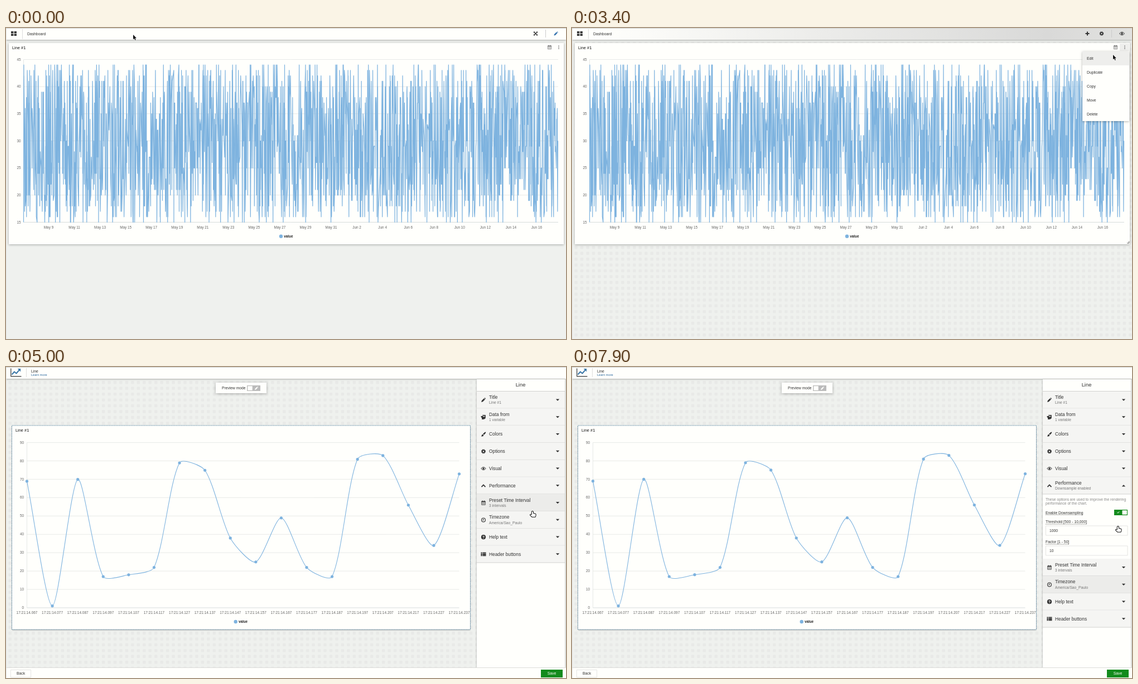
Animation, 1004 px wide and 558 px high, one loop 8000 ms. Source, as an HTML page with a canvas:

```html
<!DOCTYPE html>
<html lang="en">
<head>
<meta charset="utf-8">
<title>Dashboard</title>
<style>
html, body { margin: 0; width: 1004px; height: 558px; overflow: hidden; background: #eff1ee; }
canvas { display: block; }
</style>
</head>
<body>
<canvas id="stage" width="1004" height="558"></canvas>
<script>
const c = document.getElementById('stage').getContext('2d');
const PAPER = '#fffffc', BACK = '#eff1ee', BLUE = '#7eb3df', INK = '#333', GREEN = '#138b1d';
const SMALL = 6.8;

// ---- helpers ----
function box(x, y, w, h, fill, stroke) {
  if (fill) { c.fillStyle = fill; c.fillRect(x, y, w, h); }
  if (stroke) { c.strokeStyle = stroke; c.lineWidth = 0.8; c.strokeRect(x, y, w, h); }
}
function card(x, y, w, h, blur = 4) {
  c.save();
  c.shadowColor = 'rgba(0,0,0,.3)';
  c.shadowBlur = blur;
  c.shadowOffsetY = 1;
  box(x, y, w, h, PAPER);
  c.restore();
}
function text(s, x, y, size = SMALL, color = INK, align = 'left', weight = '') {
  c.font = `${weight} ${size}px "Liberation Sans", Arial, sans-serif`;
  c.textAlign = align;
  c.fillStyle = color;
  c.fillText(s, x, y);
}
function line(x1, y1, x2, y2, color, width = 1, dash = []) {
  c.strokeStyle = color;
  c.lineWidth = width;
  c.setLineDash(dash);
  c.beginPath();
  c.moveTo(x1, y1);
  c.lineTo(x2, y2);
  c.stroke();
  c.setLineDash([]);
}
function dot(x, y, r, color) {
  c.fillStyle = color;
  c.beginPath();
  c.arc(x, y, r, 0, 7);
  c.fill();
}
function ring(x, y, r, color, width, dash = []) {
  c.strokeStyle = color;
  c.lineWidth = width;
  c.setLineDash(dash);
  c.beginPath();
  c.arc(x, y, r, 0, 2 * Math.PI);
  c.stroke();
  c.setLineDash([]);
}

// ---- icons, centred on the given point ----
const shapes = {
  plus: 'M-3.5-1H-1V-3.5H1V-1H3.5V1H1V3.5H-1V1H-3.5Z',
  pencil: 'M-4 4L-3.3 1.2L1-3L3-1L-1.2 3.3ZM1.6-3.6L2.5-4.3L4.3-2.5L3.6-1.6Z',
  expand: 'M-4-4H-1L-2-3L0-1L2-3L1-4H4V-1L3-2L1 0L3 2L4 1V4H1L2 3L0 1L-2 3L-1 4H-4V1L-3 2L-1 0L-3-2L-4-1Z',
  blocks: 'M-5-4H-.6V-.5H-5ZM.6-4H5V-.5H.6ZM-5 .6H-.6V4H-5ZM.6 .6H5V4H.6Z',
  chevron: 'M-4.3 1.6L0-2.8L4.3 1.6L3 2.9L0-.1L-3 2.9Z',
  brush: 'M4.5-4.5L4-2L1 1.2L-1-.6L2.5-4ZM-1.5 0L.4 1.8Q0 4-2 4H-4.5Q-3.3 3.2-3.2 1.6Q-2.8 .1-1.5 0Z',
  list: 'M-4.8-3.6H-2.4V-1.5H-4.8ZM-1.6-3.6H4.8V-1.5H-1.6ZM-4.8-1H-2.4V1H-4.8ZM-1.6-1H4.8V1H-1.6ZM-4.8 1.5H-2.4V3.6H-4.8ZM-1.6 1.5H4.8V3.6H-1.6Z',
  data: 'M-2-4.2H4V2Q3 4.2-.5 4.2H-3V1.5L-4.6 0V-2H-1L1 0L3-2.6Q0-1.8-2-3Z',
  check: 'M-3 0L-2.2-.8L-.9 .5L2-2.4L2.8-1.6L-.9 2.1Z',
  up: 'M-3.2 1.6L0-1.6L3.2 1.6Z',
  down: 'M-3.2-1.6L0 1.6L3.2-1.6Z'
};
const drawn = {
  gear(color) {
    ring(0, 0, 2.3, color, 2);
    ring(0, 0, 3.6, color, 1.2, [1.6, 1.227]);
  },
  eye(color) {
    c.strokeStyle = color;
    c.lineWidth = 1;
    c.stroke(new Path2D('M-4.5 0Q0-5.4 4.5 0Q0 5.4-4.5 0Z'));
    dot(0, 0, 1.7, color);
  },
  calendar(color) {
    box(-3.5, -2.8, 7, 6.6, null, color);
    box(-3.5, -3, 7, 1.8, color);
    box(-2.4, -4.4, 1, 2, color);
    box(1.4, -4.4, 1, 2, color);
    for (const v of [-1.2, 1.2]) line(v, -1, v, 3.8, color, 0.5);
    line(-3.5, 1.2, 3.5, 1.2, color, 0.5);
  },
  clock(color) {
    ring(0, 0, 3.6, color, 1.2);
    line(0, -2.4, 0, 0.5, color);
    line(0.4, 0.3, -1.7, 0.3, color);
  },
  help(color) {
    dot(0, 0, 4.3, color);
    text('?', 0, 2.5, 7, PAPER, 'center', 'bold');
  }
};
function icon(name, x, y, color = INK, scale = 1) {
  c.save();
  c.translate(x, y);
  c.scale(scale, scale);
  if (drawn[name]) drawn[name](color);
  else { c.fillStyle = color; c.fill(new Path2D(shapes[name])); }
  c.restore();
}

// ---- shared pieces ----
function backdrop(dots, right = 1004) {
  box(0, 0, 1004, 558, BACK);
  if (!dots) return;
  c.fillStyle = '#e8e9e7';
  for (let y = 25; y < 558; y += 10.46)
    for (let x = 4.5; x < right; x += 10.46) {
      c.beginPath();
      c.roundRect(x, y, 5.4, 5.4, 1.2);
      c.fill();
    }
}
function header(fill) {
  card(0, 0, 1004, 21, 3);
  box(0, 0, 1004, 21, fill);
}
function legend(x, y) {
  dot(x, y, 3.2, BLUE);
  text('value', x + 5.3, y + 2.1, 6.3, '#222', 'left', 'bold');
}
function axisY(min, max, step, left, right, yOf, labelX) {
  for (let v = min; v <= max; v += step) {
    line(left, yOf(v), right, yOf(v), v === min ? '#d3d8d8' : '#e6e8e6', 0.9);
    text(v, labelX, yOf(v) + 2.1, 6.4, '#666', 'right');
  }
  line(left, yOf(min), left, yOf(max), '#e0e3e1', 0.8);
}

// ---- dashboard ----
let seed = 41;
const random = () => (seed = (seed * 16807) % 2147483647) / 2147483647;
const COUNT = 2000;
const noise = [];
for (let i = 0, x = 0; i < COUNT; i++) {
  noise.push([x, 15 + Math.floor(random() * 30)]);
  x += 0.15 - Math.log(random() + 0.001) * 0.85;
}
const span = noise[COUNT - 1][0];

function dashboard(t) {
  const edit = t >= 1800;
  backdrop(edit);
  let fill = PAPER;
  if (edit) {
    fill = c.createLinearGradient(0, 0, 1004, 0);
    fill.addColorStop(0.05, PAPER);
    fill.addColorStop(0.85, '#d9d9d8');
    fill.addColorStop(1, '#e2e2e0');
  }
  header(fill);
  icon('blocks', 14, 10);
  line(29.5, 2, 29.5, 20, '#ddd');
  text('Dashboard', 38, 12.8);
  line(967.5, 3, 967.5, 17, '#ccc');
  if (edit) {
    icon('plus', 924, 10);
    icon('gear', 949.5, 10, INK, 0.9);
    icon('eye', 986, 10);
  } else {
    if (t >= 1200) box(977, 4, 19, 13, '#ececea');
    icon('expand', 949.5, 10, INK, 0.9);
    icon('pencil', 986, 10, '#3a76b0', 0.9);
  }

  card(5, 27, 995, 361);
  text('Line #1', 11, 37.5, 7.4, '#111');
  if (t >= 2100) box(982, 28, 17, 13, '#eeeeec');
  icon('calendar', 974.5, 34.5, '#777', 0.9);
  for (let i = -1; i < 2; i++) dot(991, 34.5 + i * 2.4, 0.85, '#777');

  const yOf = v => 348.5 - (v - 15) * 9.733;
  axisY(15, 45, 5, 31.5, 990, yOf, 26.5);
  for (let i = 0; i < 20; i++) {
    const day = 9 + 2 * i;
    text(day > 31 ? `Jun ${day - 31}` : `May ${day}`, 76.5 + i * 46.05, 360, 6.4, '#666', 'center');
  }
  c.strokeStyle = BLUE;
  c.lineWidth = 1.25;
  c.lineJoin = 'round';
  c.beginPath();
  for (const [x, v] of noise) c.lineTo(31.5 + x / span * 958, yOf(v));
  c.stroke();
  legend(493, 373.8);
  if (edit) {
    line(995, 386, 999, 386, '#555', 0.9);
    line(998.6, 382.5, 998.6, 386, '#555', 0.9);
  }

  if (t >= 3000) {
    c.globalAlpha = Math.min(1, (t - 2900) / 300);
    card(915, 42, 84, 125);
    box(915, 42, 84, 25, '#eeeeec');
    ['Edit', 'Duplicate', 'Copy', 'Move', 'Delete'].forEach((s, i) => text(s, 923, 57 + i * 25));
    c.globalAlpha = 1;
  }
}

// ---- editor ----
const values = [69, 1, 70, 17, 18, 22, 79, 75, 38, 25, 49, 22, 17, 81, 83, 56, 34, 73];
const rows = [
  ['pencil', 'Title', 'Line #1'], ['data', 'Data from', '1 variable'], ['brush', 'Colors'],
  ['gear', 'Options'], ['eye', 'Visual'], ['chevron', 'Performance'],
  ['calendar', 'Preset Time Interval', '3 intervals'], ['clock', 'Timezone', 'America/Sao_Paulo'],
  ['help', 'Help text'], ['list', 'Header buttons']
];
const ROW = 30.75;

function chart(t) {
  const p = Math.max(0, Math.min(1, (t - 4184) / 1000));
  const grow = 1 - (1 - p) ** 4;
  const yOf = v => 432 - v * 3.294;
  card(11, 105, 821, 366, 2);
  c.setLineDash([2, 1]);
  box(10.5, 105, 822, 366, null, '#4d7f9d');
  c.setLineDash([]);
  text('Line #1', 17, 116, 7.4, '#111');
  axisY(0, 90, 10, 37.5, 812.5, yOf, 32);

  const pts = values.map((v, i) => [37.5 + i * 45.59, yOf(v * grow)]);
  // smooth curve: handles follow the neighbours, shared by distance
  const handles = pts.map((q, i) => {
    const a = pts[i - 1] || q, b = pts[i + 1] || q;
    const da = Math.hypot(q[0] - a[0], q[1] - a[1]), db = Math.hypot(b[0] - q[0], b[1] - q[1]);
    const k = 0.25 / (da + db);
    const move = d => [q[0] + d * k * (b[0] - a[0]), q[1] + d * k * (b[1] - a[1])];
    return { before: move(-da), after: move(db) };
  });
  c.strokeStyle = BLUE;
  c.lineWidth = 1.1;
  c.beginPath();
  c.moveTo(...pts[0]);
  for (let i = 1; i < pts.length; i++)
    c.bezierCurveTo(...handles[i - 1].after, ...handles[i].before, ...pts[i]);
  c.stroke();
  pts.forEach(([x, y], i) => {
    dot(x, y, 2.6, BLUE);
    text('17:21:14.' + String(67 + i * 10).padStart(3, '0'), x, 443.3, 6.5, '#666', 'center');
  });
  legend(411.7, 457);
}

function toggle(x, y, on, mark) {
  box(x, y, 24, 10, on ? GREEN : '#bbb');
  box(on ? x + 14.5 : x + 1.3, y + 1.2, 8.4, 7.6, PAPER);
  if (mark) icon(mark, x + (on ? 7.5 : 17), y + 5, PAPER, 0.75);
}

function settings(y, on) {
  const ink = on ? INK : '#999';
  const label = (s, ly, width, color) => {
    text(s, 849, ly, SMALL, color);
    line(849, ly + 1.7, 849 + width, ly + 1.7, color, 0.6, [1, 0.6]);
  };
  const field = (s, fy) => {
    box(849.4, fy, 146.6, 17, PAPER, '#dededc');
    text(s, 856, fy + 11, SMALL, on ? INK : '#777');
  };
  text('These options are used to improve the rendering', 849, y + 11.5, 6.7, '#888');
  text('performance of the chart.', 849, y + 18.5, 6.7, '#888');
  label('Enable Downsampling', y + 35.5, 67, INK);
  toggle(972, y + 28, on, on && 'check');
  label('Threshold [500 - 10,000]', y + 52.3, 73, ink);
  field('1000', y + 57);
  label('Factor [1 - 50]', y + 88.3, 42, ink);
  field('10', y + 93);
}

function panel(t) {
  const on = t >= 7100;
  const hover = latest(hovers, t)[1];
  const gap = 116 * Math.max(0, Math.min(1, (t - 5400) / 300));
  card(844, 22, 158, 517, 3);
  text('Line', 922.5, 35.3, 9.4, INK, 'center');
  rows.forEach(([name, label, sub], i) => {
    const y = 43.5 + i * ROW + (i > 5 ? gap : 0), mid = y + ROW / 2;
    if (i === 5 && on) sub = 'Downsample enabled';
    box(844, y, 158, ROW, i === hover ? '#ececea' : '#f5f5f3');
    line(844, y + ROW, 1002, y + ROW, '#d2d2d0');
    if (!i) line(844, y, 1002, y, '#d2d2d0');
    icon(name, 856, mid + 0.3, INK, 0.95);
    text(label, 866, sub ? mid - 1.7 : mid + 3, 8.35);
    if (sub) text(sub, 866, mid + 7.6, 6.7, '#777');
    icon(i === 5 && gap ? 'up' : 'down', 989, mid + 0.3);
  });
  if (gap) {
    c.save();
    c.beginPath();
    c.rect(844, 228.5, 158, gap - 1);
    c.clip();
    settings(228, on);
    c.restore();
  }
}

function editor(t) {
  backdrop(true, 843);
  header(PAPER);
  c.strokeStyle = INK;
  c.lineWidth = 1.2;
  c.stroke(new Path2D('M8.8 2.5V16.8H27.5'));
  c.strokeStyle = '#3a77a8';
  c.lineWidth = 2;
  c.stroke(new Path2D('M10.5 13.5L15 8.5L18.5 11.5L24 5.2'));
  c.fillStyle = '#3a77a8';
  c.fill(new Path2D('M20.8 3H26.2V8.4Z'));
  line(36.5, 2, 36.5, 18, '#ddd');
  text('Line', 45, 9.8);
  text('Learn more', 45, 16, 5.6, '#2d6a9f');

  card(376, 28, 91, 19, 5);
  text('Preview mode', 387, 40.3, 6.7);
  toggle(432, 33, false, 'pencil');
  chart(t);
  panel(t);

  box(0, 540, 1004, 18, PAPER);
  line(0, 539.5, 1004, 539.5, '#dcdcda');
  box(8.4, 543.4, 36.2, 13.4, PAPER, '#ddd');
  text('Back', 26.5, 552.4, SMALL, INK, 'center');
  box(959, 543, 39, 14, GREEN);
  text('Save', 978.5, 552.4, SMALL, PAPER, 'center');
}

// ---- pointer ----
// time, x, y of the tip, 1 for the hand
const path = [
  [0, 228, 12, 0], [200, 228, 12, 0], [400, 360, 40, 0], [600, 560, 78, 0], [800, 780, 84, 0],
  [1000, 980, 50, 0], [1100, 958, 28, 0], [1200, 974, 18, 0], [1300, 986, 9, 1], [1400, 986, 9, 1],
  [1600, 986, 14, 1], [1700, 986, 14, 1], [2200, 990, 34, 1], [2900, 990, 34, 1], [3200, 971, 47, 1],
  [3300, 971, 47, 1], [3400, 970, 48, 0], [4200, 970, 48, 0], [4600, 936, 90, 1], [4800, 972, 215, 1],
  [4900, 962, 246, 1], [5000, 944, 259, 1], [5300, 884, 211, 1], [5900, 884, 211, 1], [6100, 936, 241, 0],
  [6200, 936, 241, 0], [6500, 975, 258, 1], [6700, 976, 259, 1], [7600, 976, 259, 1], [7700, 940, 310, 0],
  [7800, 900, 378, 1], [7900, 979, 286, 1]
];
const hovers = [[0, -1], [4500, 3], [4700, 4], [4800, 6], [5200, 5], [6100, -1], [7800, 7]];
const latest = (list, t) => list.findLast(k => k[0] <= t);

function pointer(t) {
  const a = latest(path, t), b = path[path.indexOf(a) + 1] || a;
  const k = b === a ? 0 : (t - a[0]) / (b[0] - a[0]);
  c.save();
  c.translate(a[1] + (b[1] - a[1]) * k, a[2] + (b[2] - a[2]) * k);
  const shape = new Path2D(a[3]
    ? 'M-1.2 .8Q0-.8 1 .8V3.8L5 4.8Q6 5.2 5.6 7L4.8 9.8H-.8L-4 6.6Q-4 5-1.2 6.2Z'
    : 'M0 0V8.5L2 6.7L3.4 10L4.8 9.4L3.4 6.2H6Z');
  c.lineJoin = 'round';
  c.lineWidth = a[3] ? 2 : 1.2;
  c.strokeStyle = a[3] ? '#111' : '#fff';
  c.fillStyle = a[3] ? '#fff' : '#111';
  c.stroke(shape);
  c.fill(shape);
  c.restore();
}

// ---- playback in steps of 100 ms ----
function draw(t) {
  if (t < 3800) dashboard(t);
  else if (t < 4000) backdrop(false);
  else editor(t);
  box(0, 0, 1004, 1, '#cfd1cf');
  box(0, 1, 0.8, 557, '#e2e3e1');
  pointer(t);
}
let shown = -1;
const start = performance.now();
function tick() {
  const t = Math.floor((performance.now() - start) % 8000 / 100) * 100;
  if (t !== shown) draw(shown = t);
  requestAnimationFrame(tick);
}
draw(0);
tick();
</script>
</body>
</html>
```
